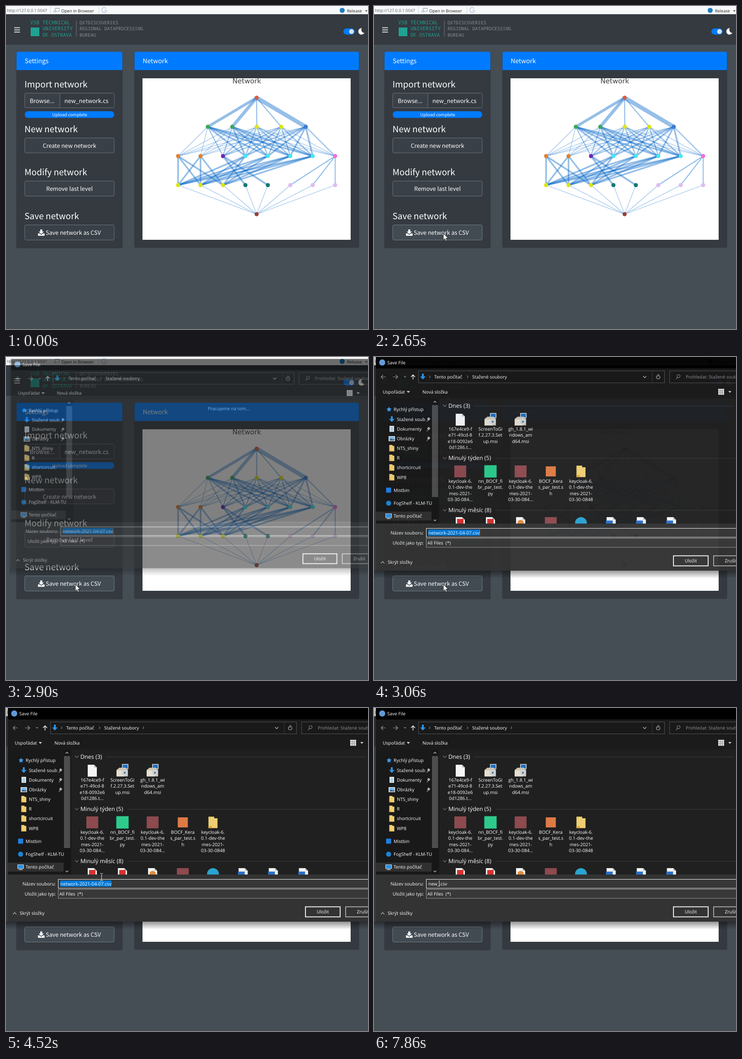
These frames come from a looping animation (793x706 px, 8000 ms). An HTML page:

```html
<!DOCTYPE html>
<html lang="en">
<head>
<meta charset="utf-8">
<title>Save network</title>
<style>
html, body { margin: 0; width: 100%; height: 100%; overflow: hidden; background: #454d55; }
svg { display: block; width: 100%; height: 100%; }
text { font-family: "Open Sans", "Noto Sans", sans-serif; white-space: pre; text-rendering: geometricPrecision; }
.app { font-family: "Noto Sans CJK SC", "Noto Sans CJK JP", "Noto Sans CJK", "Open Sans", sans-serif; }
.mono { font-family: "Noto Sans Mono", "DejaVu Sans Mono", monospace; }
.plot { font-family: "DejaVu Sans", sans-serif; }
</style>
</head>
<body>
<svg id="stage" viewBox="0 0 793 706" xmlns="http://www.w3.org/2000/svg"></svg>
<script>
const LOOP = 8000;
const rect = (x, y, w, h, fill, more = '') =>
  `<rect x="${x}" y="${y}" width="${w}" height="${h}" fill="${fill}" ${more}/>`;
const dot = (x, y, r, fill, more = '') => `<circle cx="${x}" cy="${y}" r="${r}" fill="${fill}" ${more}/>`;
const text = (x, y, str, size, fill = '#fff', more = '') =>
  `<text x="${x}" y="${y}" font-size="${size}" fill="${fill}" ${more}>${str}</text>`;
const line = (d, stroke = '#fff', w = 1, more = '') =>
  `<path d="${d}" fill="none" stroke="${stroke}" stroke-width="${w}" ${more}/>`;
const shape = (d, fill = '#fff', more = '') => `<path d="${d}" fill="${fill}" ${more}/>`;
const app = (x, y, str, size, more = '') => text(x, y, str, size, '#fff', 'class="app" ' + more);
const mid = 'text-anchor="middle"';

// ---- page ----
function browserBar() {
  return rect(0, 0, 793, 18, '#f6f8f9') + rect(0, 17.5, 793, 1, '#d5d9dc') +
    text(2, 13, 'http://127.0.0.1:5047', 9.07, '#5c5c5c') +
    line('M97.5 2V16M203.5 2V16', '#d0d4d8') +
    rect(107.5, 4.5, 9, 7, '#fff', 'stroke="#9aa5b0"') + rect(107, 4, 10, 2, '#a9b6c4') +
    shape('M104 14V10H108V8L112 11.5L108 15V13Z', '#c3ccd6') +
    text(121, 13.5, 'Open in Browser', 9.2, '#222') +
    line('M219.5 5.5A5.5 5.5 0 1 0 220.5 9.5H215.5', '#b6c6d8', 1.6) +
    dot(736.5, 9.5, 5.5, '#1c7fc0') + text(747, 13.5, 'Release', 9.1, '#222') +
    shape('M786.5 9.5H792L789.2 12.5Z', '#444');
}

function header() {
  const teal = '#1fa294', grey = '#868c91';
  const mono = (x, y, s, size, c) => text(x, y, s, size, c, 'class="mono"');
  return rect(0, 18, 793, 67, '#343a40') + rect(0, 85, 793, 1, '#4b545c') +
    [47.5, 52.3, 57].map(y => rect(18, y - .9, 12.5, 1.8, '#e8e9ea')).join('') +
    mono(53, 40, 'VSB TECHNICAL', 11.2, teal) + mono(80, 53.3, 'UNIVERSITY', 11, teal) +
    mono(80, 66.5, 'OF OSTRAVA', 10.7, teal) + rect(54, 47, 19, 19, teal) +
    rect(153.5, 32, 1, 35, '#747a80') +
    mono(161, 40, 'QX7DISCOVERIES', 10.1, grey) + mono(161, 53.3, 'REGIONAL DATAPROCESSING', 10.1, grey) +
    mono(161, 66.5, 'BUREAU', 10.1, grey) +
    rect(739, 49, 25, 13.5, '#007bff', 'rx="6.75"') + dot(756.8, 55.7, 5.2, '#dee2e6') +
    shape('M779.5 48.6A7 7 0 1 0 785 58.8A6.6 6.6 0 0 1 779.5 48.6Z');
}

const card = (x, w, h, title) =>
  rect(x - 1, 101, w + 2, h, '#3b4249', 'rx="4"') + rect(x, 100, w, h, '#343a40', 'rx="3.5"') +
  shape(`M${x} 140V103.5a3.5 3.5 0 0 1 3.5 -3.5h${w - 7}a3.5 3.5 0 0 1 3.5 3.5V140Z`, '#007bff') +
  app(x + 18, 124.5, title, 13.8);

const button = (y, h, id = '') =>
  rect(41, y + .5, 196, h - 1, '#3a4047', `rx="3" stroke="#6c757d" ${id}`);

function settings() {
  const head = (y, s) => app(40.5, y, s, 18.9);
  return card(23, 232, 429, 'Settings') +
    head(177.5, 'Import network') + head(275.5, 'New network') +
    head(370, 'Modify network') + head(466, 'Save network') +
    button(190, 33) + rect(118, 191, 118.5, 31, '#343a40', 'rx="2"') + rect(117.5, 190.5, 1, 32, '#6c757d') +
    app(79, 212, 'Browse...', 12.6, mid) + app(128, 212, 'new_network.cs', 12.6) +
    rect(41, 230, 196, 14.5, '#007bff', 'rx="7"') + app(139.5, 241, 'Upload complete', 9.55, mid) +
    button(288, 33.5) + app(139, 309.5, 'Create new network', 12.6, mid) +
    button(382, 34) + app(139, 404, 'Remove last level', 12.6, mid) +
    button(478, 34, 'id="save"') + app(87, 500.3, 'Save network as CSV', 12.6) +
    shape('M75 488.5h4.5v4.5h3.5l-5.7 5.5l-5.7 -5.5h3.4Z') +
    shape('M70 497h3.5l3.8 3.2l3.8 -3.2h3.4v5.3h-14.5Z');
}

function network() {
  const rows = [200.5, 264, 328, 391.5, 455];
  const spread = (n, x0, gap) => Array.from({ length: n }, (_, i) => x0 + i * gap);
  const wide = spread(8, 377, 49.15);
  const xs = [[549], spread(5, 442, 53.65), wide, wide, [549]];
  const yel = '#dbe512', cyan = '#46e9f2', green = '#3ea757', lilac = '#e0baf3', teal = '#14796f';
  const fills = [['#dc5a3e'], [green, green, yel, yel, '#3d7cd2'],
    ['#e0802f', '#e0802f', '#6b2bb5', cyan, cyan, cyan, cyan, '#ec6fdd'],
    [yel, yel, yel, teal, teal, lilac, lilac, lilac], ['#97433a']];
  let edges = '', nodes = '';
  const link = (r, a, b, w) =>
    edges += line(`M${xs[r][a]} ${rows[r]}L${xs[r + 1][b]} ${rows[r + 1]}`, '#0666c8', w, 'opacity=".42"');
  [6, 7, 2.3, 2.3, 9].forEach((w, i) => link(0, 0, i, w));
  for (let a = 0; a < 5; a++)
    for (let b = 0; b < 8; b++)
      link(1, a, b, b < 2 ? 1.1 : b == 2 ? 2.2 : b < 7 ? (a == 2 || a == 3 ? 2.4 : 3.6) : a == 4 ? 2.4 : 1.1);
  for (const a of [0, 1, 3, 4, 5, 6])
    for (let b = 0; b < 3; b++) link(2, a, b, 3.6);
  link(2, 2, 3, 4); link(2, 2, 4, 4);
  for (let b = 5; b < 8; b++) link(2, 7, b, 2.2);
  for (let a = 0; a < 8; a++) link(3, a, 0, 1.1);
  xs.forEach((row, r) => row.forEach((x, i) => nodes += dot(x, rows[r], 4.5, fills[r][i])));
  return card(281.5, 491.5, 428, 'Network') + rect(299, 158, 456, 353, '#fff') +
    text(527.5, 169.3, 'Network', 15.1, '#3c3c3c', 'class="plot" ' + mid) + edges + nodes;
}

// ---- save dialog ----
const GROUPS = [106.5, 220.8, 334.6];
const COLS = Array.from({ length: 8 }, (_, i) => 189 + i * 66.1);
const chevron = (x, y, r, dir, c = '#ccc', w = 1.1) =>
  line(`M${x - r} ${y - r / 2 * dir}L${x} ${y + r / 2 * dir}L${x + r} ${y - r / 2 * dir}`, c, w);
const next = x => line(`M${x - 1.3} 40.5L${x + 1.3} 43.3L${x - 1.3} 46`, '#bbb');
const downArrow = (x, y) => shape(`M${x - 2} ${y - 6.5}h4v6h4.2l-6.2 6.5l-6.2 -6.5h4.2Z`, '#2e93e6');
const page = (x, y, fill = '#f4f4f4') =>
  shape(`M${x - 10} ${y - 13}h14l6 6v20h-20Z`, fill) + shape(`M${x + 4} ${y - 13}v6h6Z`, '#bdbdbd');
const folder = (x, y, k = 1) =>
  shape(`M${x - 5.5 * k} ${y - 7 * k}h${7 * k}v${2 * k}h${4 * k}v${12 * k}h${-11 * k}Z`, '#f0cf72') +
  rect(x - 5.5 * k, y + 4.5 * k, 4 * k, 2.5 * k, '#dba83c');
const square = (x, y, r, fill) => rect(x - r, y - r, 2 * r, 2 * r, fill);
const installer = (x, y) =>
  rect(x - 1, y - 14, 14, 11, '#d6dde3') + rect(x + .5, y - 12.5, 11, 8, '#1d6fc4') +
  rect(x + 3, y - 3, 6, 2, '#aeb7be') + shape(`M${x - 13} ${y - 1}l6 -5h14l5 5v14h-25Z`, '#cfc6b4') +
  rect(x - 13, y, 18, 13, '#e6dfcf') + dot(x + 5, y + 5, 6.5, '#c9d3da') + dot(x + 5, y + 5, 2, '#57636c');

function topBars() {
  return rect(4, 0, 830, 26, '#000') + rect(4, 25, 830, 66, '#1b1b1b') +
    dot(18, 12, 6.7, '#5f9bd8') + text(29, 16, 'Save File', 10) +
    line('M25.5 43.5H15.5M20 39L15.5 43.5L20 48', '#9a9a9a', 1.2) +
    line('M41.5 43.5H52M47.5 39L52 43.5L47.5 48', '#9a9a9a', 1.2) + chevron(68, 43, 2.4, 1, '#999') +
    line('M85.5 49V39M81 43.5L85.5 39L90 43.5', '#fff', 1.4) +
    rect(97.5, 30.5, 539, 26, '#191919', 'stroke="#535353"') + rect(647.5, 30.5, 190, 26, '#191919', 'stroke="#535353"') +
    downArrow(107, 43) + next(122) + text(132, 47, 'Tento počítač', 9.9) + next(205) +
    text(215, 47, 'Stažené soubory', 9.85) + `<g id="tail">${next(301)}</g>` +
    chevron(593, 43.5, 3.6, 1, '#ccc', 1.2) + line('M609.5 31V56', '#3a3a3a') +
    line('M625.5 41.3A4 4 0 1 1 621 40.2M621.5 37.5L624.5 40.5L621 42.5', '#bbb', 1.1) +
    line('M661.5 48L665 44.5M670.5 41.8A3.3 3.3 0 1 1 663.9 41.8A3.3 3.3 0 1 1 670.5 41.8', '#8a8a8a', 1.1) +
    text(683, 47, 'Prohledat: Stažené soubory', 9.9, '#929292') +
    text(19, 79.5, 'Uspořádat', 10) + shape('M71.5 74.5H79L75.2 78.3Z', '#ddd') +
    text(106, 79.5, 'Nová složka', 10) +
    rect(754, 69.5, 13, 13, '#e6e6e6') +
    line('M754 74H767M754 78.3H767M758.3 70V82M762.7 70V82', '#666', .8) +
    shape('M776 74.5H783L779.5 78.3Z', '#ddd');
}

function sidebar() {
  const pin = y => shape(`M116.5 ${y - 1}l3 -3.5l4 4l-3.5 3l-1 0l-3.5 3.5l-.5 -.5l3 -4Z`, '#a9b1b8');
  const row = (x, y, s) => text(x, y + 3.7, s, 10);
  let out = rect(4, 91, 139, 273, '#191919') + rect(4, 338, 122, 19.5, '#303030') +
    shape('M33 108.5l1.7 3.8l4 .4l-3 2.8l.9 4l-3.6 -2l-3.6 2l.9 -4l-3 -2.8l4 -.4Z', '#3c9df0') +
    row(43, 114.7, 'Rychlý přístup') + downArrow(39, 136) + row(50, 136, 'Stažené soub') +
    rect(34, 150.5, 10, 13, '#e9edf0') + line('M36 154.5H42M36 157.5H42M36 160.5H42', '#4c8fc4') +
    row(50, 157, 'Dokumenty') +
    rect(32, 173, 14, 11, '#e9edf0') + rect(33.5, 174.5, 11, 8, '#6fb4e8') + shape('M33.5 182.5l4 -4l3 2l4 -1v3Z', '#40566b') +
    row(50, 178, 'Obrázky') + pin(136) + pin(157) + pin(178);
  ['NTS_shiny', 'R', 'shortcircuit', 'WP8'].forEach((s, i) => {
    const y = 199.2 + i * 21.2;
    out += folder(39, y) + row(50, y, s);
  });
  return out + square(32, 291, 5.5, '#1f7fe8') + row(43, 291, 'Mistbin') +
    dot(32, 319.5, 5.5, '#1b86d6') + row(43, 319, 'FogShelf - KLM-TU') +
    rect(25, 342, 14, 9.5, '#cfd6dc') + rect(26, 343, 12, 7.5, '#2f8fdf') + rect(28, 352.5, 8, 1.5, '#cfd6dc') +
    row(43, 347.5, 'Tento počítač') +
    rect(127, 91, 14, 273, '#171717') + rect(127, 105, 13.5, 201, '#4d4d4d') +
    chevron(133.5, 98, 3, -1) + chevron(133.5, 357, 3, 1);
}

function files() {
  const label = (col, y, ...lines) =>
    lines.map((s, i) => text(COLS[col], y + i * 13.3, s, 10.1, '#fff', mid)).join('');
  const zip = ['keycloak-6.', '0.1-dev-the', 'mes-2021-', '03-30-084...'];
  const rar = '#8d4a4f';
  let out = '';
  [['Dnes (3)', 219], ['Minulý týden (5)', 265], ['Minulý měsíc (8)', 266]].forEach(([s, x], i) => {
    const y = GROUPS[i];
    out += chevron(155, y, 4, 1, '#7d7d7d') + text(163, y + 4.3, s, 12.5) + rect(x, y, 570, 1, '#3a3a3a');
  });
  out += page(189, 137) + installer(COLS[1], 136.5) + installer(COLS[2], 136.5) +
    label(0, 161, '167e4ce9-f', 'e71-49cd-8', 'e18-0092e6', '0d1286.t...') +
    label(1, 161, 'ScreenToGi', 'f.2.27.3.Set', 'up.msi') + label(2, 161, 'gh_1.8.1_wi', 'ndows_am', 'd64.msi') +
    square(COLS[0], 250, 13, rar) + square(COLS[1], 250, 13.5, '#2ccb8c') + square(COLS[2], 250, 13, rar) +
    square(COLS[3], 250, 11, '#de7a45') + folder(COLS[4], 250, 1.8) +
    label(0, 275, ...zip) + label(1, 275, 'nn_BOCF_fi', 'br_par_test.', 'py') + label(2, 275, ...zip) +
    label(3, 275, 'BOCF_Kera', 's_par_test.s', 'h') + label(4, 275, ...zip.slice(0, 3), '03-30-0848');
  COLS.forEach((x, i) => {
    if (i != 3 && i != 4) out += page(x, 363);
    out += i < 2 ? square(x, 361, 7, '#d8322f') : i == 2 ? dot(x, 363, 7, '#e58a3a') :
      i == 3 ? square(x, 363, 13, rar) : i == 4 ? dot(x, 363, 13, '#2ba3cf') : square(x - 4, 365, 7.5, '#2a6fc9');
  });
  return out;
}

function footer() {
  const end = 'text-anchor="end"';
  return rect(4, 364, 830, 103, '#333') +
    text(109, 387.7, 'Název souboru:', 10, '#fff', end) + text(109, 410.2, 'Uložit jako typ:', 10, '#fff', end) +
    rect(114.5, 374.5, 720, 19.5, '#383838', 'stroke="#f0f0f0"') +
    rect(114.5, 396.5, 720, 19.5, '#383838', 'stroke="#9a9a9a" id="type"') +
    text(117, 410, 'All Files  (*)', 10) +
    rect(0, 377, 0, 13.5, '#0078d7', 'id="mark"') + text(119, 387.5, '', 10.1, '#fff', 'id="name"') +
    rect(0, 377, 1, 13, '#fff', 'id="caret"') +
    chevron(19, 449, 3.6, -1, '#ccc', 1.2) + text(30, 452, 'Skrýt složky', 10) +
    rect(656, 434.5, 76, 22, '#333', 'stroke="#fff" stroke-width="1.8"') + text(694, 449, 'Uložit', 10, '#fff', mid) +
    rect(744, 434.5, 76, 22, '#333', 'stroke="#c8c8c8" stroke-width="1.5"') + text(768.5, 449, 'Zrušit', 10);
}

const stage = document.getElementById('stage');
stage.innerHTML =
  `<defs><linearGradient id="fall" x2="0" y2="1"><stop stop-color="#000" stop-opacity=".42"/>
   <stop offset="1" stop-color="#000" stop-opacity="0"/></linearGradient></defs>` +
  rect(0, 0, 793, 706, '#454d55') + browserBar() + header() + settings() + network() +
  '<g id="dialog">' + rect(0, 467, 840, 17, 'url(#fall)') + rect(0, 0, 4, 467, '#000', 'opacity=".22"') +
  rect(143, 91, 700, 273, '#202020') + topBars() + sidebar() +
  '<g id="files">' + rect(145, 0, 700, 24, '#4d4d4d', 'id="band"') + rect(155, 0, 68, 86, '#4d4d4d', 'id="cell"') +
  files() + '</g>' + text(490, 114, 'Pracujeme na tom...', 10, '#cfe6fa', 'id="busy" ' + mid) + footer() + '</g>' +
  shape('M0 0V14.4L3.3 11.4L5.6 16.6L7.8 15.6L5.6 10.5H10.2Z', '#fff', 'id="arrow" stroke="#111" stroke-width=".8"') +
  line('M-3 -8H-1L0 -7L1 -8H3M0 -7V7M-3 8H-1L0 7L1 8H3', '#f2f2f2', 1, 'id="beam"');

const el = Object.fromEntries([...stage.querySelectorAll('[id]')].map(e => [e.id, e]));
const show = (e, on) => e.setAttribute('visibility', on ? 'inherit' : 'hidden');
const set = (e, attrs) => { for (const k in attrs) e.setAttribute(k, attrs[k]); };

// ---- motion ----
// Pointer moves: start, end, number of steps, target
const MOVES = [
  [220, 680, 7, 555, 545], [1240, 1940, 10, 141, 486], [2500, 2575, 2, 147, 501], [2650, 2650, 1, 152, 497],
  [3270, 3740, 7, 186, 178], [3900, 3900, 1, 176, 218], [3970, 3970, 1, 165, 395], [4040, 4040, 1, 158, 376],
  [4200, 4360, 3, 196, 328], [4440, 4600, 3, 214, 384], [4980, 5130, 3, 67, 384]
];
// Dialog opening: time, opacity, scale
const OPENING = [[0, 0, .95], [2810, .2, .955], [2900, .57, .98], [2970, .85, .995], [3060, .975, 1], [3120, 1, 1]];
const TYPING = [[0, 'network-2021-04-07'], [5990, 'n'], [6150, 'ne'], [6240, 'new'], [6700, 'new%'], [7400, 'new'], [7860, 'new_']];
const at = (list, t) => list.filter(e => t >= e[0]).pop();

function pointer(t) {
  let x = 751, y = 681;
  for (const [t0, t1, n, tx, ty] of MOVES) {
    if (t < t0) break;
    const i = n > 1 ? Math.floor((t - t0) * (n - 1) / (t1 - t0) + 1e-6) + 1 : 1;
    const k = Math.min(1, i / n), e = k * k * (3 - 2 * k);
    x += (tx - x) * e;
    y += (ty - y) * e;
  }
  return { x, y };
}

function draw(t) {
  const { x, y } = pointer(t);
  const [, alpha, s] = at(OPENING, t);
  const open = t >= 3120;
  set(el.dialog, { opacity: alpha, transform: `translate(375 214) scale(${s}) translate(-375 -214)` });
  show(el.files, t >= 3060);
  show(el.busy, t < 3060);
  show(el.tail, t >= 3270);

  const beam = t >= 4520;
  show(el.arrow, t >= 220 && !beam);
  show(el.beam, beam && t < 5130);
  set(el.arrow, { transform: `translate(${x} ${y})` });
  set(el.beam, { transform: `translate(${x} ${y})` });

  const onSave = t >= 2810 || (x > 41 && x < 237 && y > 478 && y < 512);
  set(el.save, { fill: onSave ? '#424a52' : '#3a4047', stroke: onSave ? '#747d86' : '#6c757d' });
  set(el.type, { fill: open && !beam && y > 394 && y < 416 ? '#4d4d4d' : '#383838' });
  const group = GROUPS.find(g => Math.abs(y - g) < 12);
  show(el.band, open && !beam && group);
  if (group) set(el.band, { y: group - 11.8 });
  const row = [120, 234].find(r => y > r && y < r + 86);
  show(el.cell, open && !beam && !group && row && x > 155 && x < 223);
  if (row) set(el.cell, { y: row });

  const typed = at(TYPING, t)[1];
  if (el.name.textContent !== typed + '.csv') el.name.textContent = typed + '.csv';
  const stem = 119 + el.name.getSubStringLength(0, typed.length);
  const full = 119 + el.name.getComputedTextLength();
  let from = 119, to = full;
  if (t >= 4760) to = t < 4980 || t >= 5990 ? from : stem;
  if (t >= 4980 && t < 5130) from = Math.min(stem, Math.max(119, x));
  set(el.mark, { x: from, width: Math.max(0, to - from) });
  const early = t < 3600;
  set(el.caret, { x: early ? full : stem - .5, fill: early ? '#c98a45' : '#fff' });
  show(el.caret, early || (t >= 4760 && t < 4980) || (t >= 5990 && !(t >= 7230 && t < 7400)));
}

const start = performance.now();
function tick() {
  draw((performance.now() - start) % LOOP);
  requestAnimationFrame(tick);
}
tick();
</script>
</body>
</html>
```
